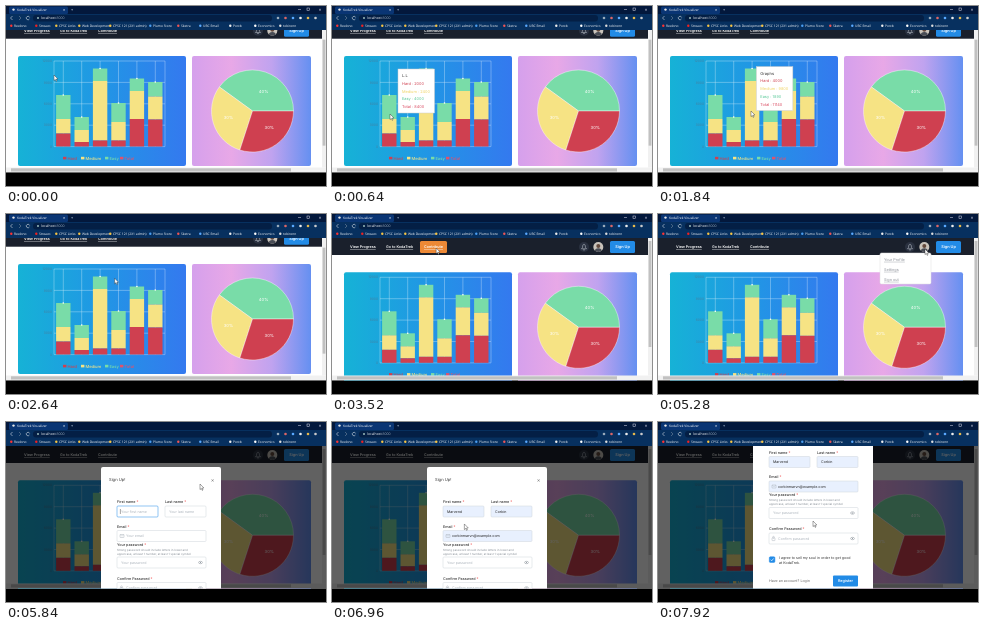
Animation, 320 px wide and 180 px high, one loop 8 s. Source, as an HTML page:

```html
<!DOCTYPE html>
<html lang="en">
<head>
<meta charset="utf-8">
<title>Practice dashboard</title>
<style>
  html, body { margin: 0; width: 100%; height: 100%; overflow: hidden; background: #000; }
  svg { display: block; width: 100vw; height: 100vh; }
  text { font-family: Inter, sans-serif; text-rendering: geometricPrecision; white-space: pre; }
  .ui { font-family: "Open Sans", sans-serif; }
  .medium { font-weight: 500; }
  .strong { font-weight: 600; }
  .link { text-decoration: underline; }
</style>
</head>
<body>
<svg viewBox="0 0 320 180" preserveAspectRatio="none">
  <defs>
    <linearGradient id="sea"><stop stop-color="#16b2d6"/><stop offset=".5" stop-color="#2196e5"/><stop offset="1" stop-color="#3479ef"/></linearGradient>
    <linearGradient id="dusk"><stop stop-color="#d5a0ec"/><stop offset=".33" stop-color="#e8a8e7"/><stop offset=".67" stop-color="#c0a3ef"/><stop offset="1" stop-color="#6590f1"/></linearGradient>
    <clipPath id="page"><rect y="24" width="320" height="142.5"/></clipPath>
    <clipPath id="portrait"><circle cx="266.3" cy="33" r="5"/></clipPath>
  </defs>
  <g id="scene"></g>
</svg>
<script>
const LOOP = 8000, STEP = 80;
const scene = document.getElementById('scene');
const GREEN = '#79dca8', YELLOW = '#f6e384', RED = '#cf4050', BLUE = '#228be6';

// ---- markup helpers ----
const box = (x, y, w, h, fill, r = 0, stroke = 'none') =>
  `<rect x="${x}" y="${y}" width="${w}" height="${h}" rx="${r}" fill="${fill}" stroke="${stroke}" stroke-width=".5"/>`;
const disc = (x, y, r, fill) => `<circle cx="${x}" cy="${y}" r="${r}" fill="${fill}"/>`;
const line = (points, stroke, width = 0.5, fill = 'none') =>
  `<polyline points="${points}" fill="${fill}" stroke="${stroke}" stroke-width="${width}"/>`;
const text = (s, x, y, size, fill, cls = '', anchor = 'start') =>
  `<text x="${x}" y="${y + size * 0.35}" font-size="${size}" fill="${fill}" class="${cls}" text-anchor="${anchor}">${s}</text>`;
const group = (content, attrs) => `<g ${attrs}>${content}</g>`;
const shift = (content, x, y) => group(content, `transform="translate(${x} ${y})"`);
const each = (list, fn) => list.map(fn).join('');

// ---- motion helpers ----
const ramp = (t, a, b) => {
  const p = Math.max(0, Math.min(1, (t - a) / (b - a)));
  return p * p * (3 - 2 * p);
};
function track(t, keys) {
  const i = keys.findIndex(k => k[0] > t);
  if (i < 0) return keys.at(-1).slice(1);
  if (i === 0) return keys[0].slice(1);
  const a = keys[i - 1], b = keys[i], p = ramp(t, a[0], b[0]);
  return a.slice(1).map((v, j) => v + (b[j + 1] - v) * p);
}

const POINTER = [
  [0, 48, 69], [640, 58, 108], [960, 60, 109], [1280, 76, 110], [1840, 93, 105],
  [2400, 112, 98], [2720, 108, 58], [3040, 68, 35], [3440, 104, 34], [3760, 105, 34],
  [4480, 266, 33], [4640, 266, 34], [4960, 238, 56], [5280, 267, 35], [5520, 289, 34],
  [5600, 289, 34], [5840, 194, 62], [6320, 128, 90], [6560, 128, 90], [6800, 128, 100],
  [7360, 150, 110], [7600, 114, 138], [7680, 114, 138], [7920, 155, 99]
];
const TOOLTIP = [
  [160, 57, 70], [560, 66, 63], [960, 66, 63], [1320, 84, 64], [1600, 84, 64],
  [1920, 101, 60], [2160, 103, 59], [2480, 121, 54]
];
const TIPS = [
  ['L.L', 2000, 2400, 4000, 8400],
  ['Trees', 1000, 1700, 1700, 4400],
  ['Graphs', 4000, 9800, 1890, 11140],
  ['Heaps', 800, 2500, 2900, 6200]
];

// Tops of the green, yellow and red parts of each bar.
const BARS = [[89, 113, 127.5], [111, 124, 136], [62.5, 75, 134.5], [97, 116, 134.5], [72.5, 85, 113], [76, 90.5, 113.5]];
const barX = i => 57.3 + i * 18.4;
const BASE = 140.5;

const BOOKMARKS = [
  ['Reelono', 8, '#f33'], ['Streavo', 33, '#e22'], ['CPSC Links', 53, '#f6c445'],
  ['Web Development', 76, '#f6c445'], ['CPSC 121 (2X1 admin)', 107, '#f6c445'],
  ['Plumo Store', 147, '#4a9df0'], ['Sketra', 175, '#e55'], ['UBC Email', 197, '#5aa9ff'],
  ['Postb', 227, '#eee'], ['Economics', 252, '#fff'], ['tobirenn', 277, '#ddd']
];

function chrome() {
  return box(0, 0, 320, 8, '#03183c') + box(3, 0.5, 59, 7.5, '#0a3574', 1.5) +
    disc(7.5, 3.6, 1.2, '#e8e8e8') +
    text('KodaTrek Visualizer', 11, 3.6, 3.3, '#fff', 'ui') +
    text('×', 58, 3.5, 4, '#fff', '', 'middle') + text('+', 66, 3.5, 4, '#cde', '', 'middle') +
    line('292,3.5 295,3.5', '#dde') + box(301, 2, 2.6, 2.6, 'none', 0, '#dde') +
    text('×', 314, 3.5, 4.5, '#dde', '', 'middle') +
    box(0, 8, 320, 16, '#07305f') +
    line('6.5,10 4.5,12 6.5,14', '#fff') + line('13,10 15,12 13,14', '#89a') +
    '<path d="M23.4 13a1.7 1.7 0 1 1 .2-1.5" fill="none" stroke="#fff" stroke-width=".5"/>' +
    box(27, 9, 239, 6.4, '#041f45', 3) + disc(32, 12.1, 1, '#9bb') +
    text('localhost:<tspan fill="#9ab">3000</tspan>', 35, 12.1, 3.5, '#fff', 'ui') +
    each(['#9ab', '#d66', '#5aa9ff', '#eee', '#e6b84c', '#ccc'], (c, i) => disc(272 + i * 7.5, 12, 1.3, c)) +
    each(BOOKMARKS, ([label, x, color]) => disc(x - 2.7, 19.8, 1.2, color) + text(label, x, 19.8, 3.3, '#fff', 'ui'));
}

function nav([px, py]) {
  const links = [['View Progress', 18, 26], ['Go to KodaTrek', 54, 29], ['Contribute', 92, 20]];
  const isOver = (x, w) => py > 27 && py < 39 && px > x - 4 && px < x + w + 3;
  const portrait = box(261, 28, 11, 11, '#c9c3bb') + disc(266.3, 32, 2, '#63493c') + disc(266.3, 38, 3.7, '#484c55');
  return box(0, 24, 320, 17, '#1a202c') +
    each(links, ([label, x, w]) =>
      (isOver(x, w) ? box(x - 4, 27, w + 7, 12, '#ed8936', 1.5) : '') +
      text(label, x, 33, 3.7, '#fff', 'strong link')) +
    disc(252, 33, 5, '#2a3140') +
    '<path d="M249.5 34.8l1-1.3c0-4.4 3-4.4 3 0l1 1.3z" fill="none" stroke="#cbd0d8" stroke-width=".5"/>' +
    disc(252, 35.8, 0.6, '#cbd0d8') +
    group(portrait, 'clip-path="url(#portrait)"') +
    box(278, 27, 25, 12, BLUE, 1.5) + text('Sign Up', 290.5, 33, 3.9, '#fff', 'strong', 'middle');
}

function barChart() {
  const vertical = x => line([x, 55, x, BASE], '#fff', 0.4);
  const grid = each([0, 1, 2, 3, 4], i => {
    const y = 55 + i * 21.4;
    return line([48, y, 159, y], '#fff', 0.4) + text(12000 - i * 3000, 46, y, 3.3, '#56708a', '', 'end');
  }) + each([48, 159, ...BARS.map((_, i) => barX(i))], vertical);
  const bars = each(BARS, ([g, y, r], i) => {
    const x = barX(i) - 7.2;
    return box(x, g, 14.4, y - g, GREEN) + box(x, y, 14.4, r - y, YELLOW) +
      box(x, r, 14.4, BASE - r, RED) + disc(barX(i), g, 0.8, '#fff');
  });
  const legend = [['Hard', 57, RED], ['Medium', 75, YELLOW], ['Easy', 99, GREEN], ['Total', 114, '#e0526c']];
  return box(12, 50, 168, 110, 'url(#sea)', 2) + group(grid, 'opacity=".75"') + bars +
    each(legend, ([label, x, color]) =>
      box(x, 150.8, 3.4, 2.6, color) + text(label, x + 4.4, 152.2, 4.1, color, 'medium'));
}

function pieChart() {
  const cx = 246.5, cy = 105, r = 41;
  const at = (turn, radius) => [cx + Math.cos(turn * 2 * Math.PI) * radius, cy - Math.sin(turn * 2 * Math.PI) * radius];
  let from = 0;
  return box(186, 50, 119, 110, 'url(#dusk)', 2) +
    each([[0.4, GREEN, 'start'], [0.3, YELLOW, 'end'], [0.3, RED, 'start']], ([share, color, anchor]) => {
      const to = from + share, label = at((from + to) / 2, r / 2);
      const slice = `<path d="M${cx} ${cy}L${at(from, r)}A${r} ${r} 0 0 0 ${at(to, r)}z" fill="${color}" stroke="#fff" stroke-width=".4"/>`;
      from = to;
      return slice + text(share * 100 + '%', ...label, 4.2, '#fff', '', anchor);
    });
}

function tooltip(t) {
  if (t < 160 || t >= 2640) return '';
  const [x, y] = track(t, TOOLTIP);
  const [name, ...values] = TIPS[t < 1120 ? 0 : t < 1680 ? 1 : t < 2240 ? 2 : 3];
  const colors = [RED, '#efd25e', '#55c795', '#d8455c'];
  return shift(box(0, 0, 36.5, 44, '#fff', 0, '#ccc') + text(name, 4, 6.5, 4, '#333') +
    each(['Hard', 'Medium', 'Easy', 'Total'], (label, i) =>
      text(`${label} : ${values[i]}`, 4, 14.5 + i * 7.8, 3.9, colors[i])), x, y);
}

function menu(t) {
  if (t < 4640 || t >= 5600) return '';
  return box(222, 39, 51, 31, '#fff', 1.5, '#ddd') +
    each(['Your Profile', 'Settings', 'Sign out'], (label, i) => text(label, 226, 45.5 + i * 10, 3.8, '#8b8f98', 'link'));
}

const fieldLabel = (label, x, y) =>
  text(`${label} <tspan fill="#f03e3e">*</tspan>`, x, y, 3.7, '#333', 'medium');

const ICONS = {
  mail: box(3, 4, 4, 3, 'none', 0.4, '#adb5bd') + line('3,4 5,5.7 7,4', '#adb5bd', 0.4),
  lock: box(3, 5, 3, 2.6, 'none', 0.4, '#adb5bd') + box(3.7, 3.3, 1.6, 1.9, 'none', 0.8, '#adb5bd')
};
const EYE = '<ellipse rx="2" ry="1.2" fill="none" stroke="#868e96" stroke-width=".5"/>' + disc(0, 0, 0.6, '#868e96');

function field(x, y, w, hint, value, { icon, eye, focus } = {}) {
  return shift(box(0, 0, w, 11, value ? '#e8f0fe' : '#fff', 1, focus ? BLUE : '#ced4da') +
    (ICONS[icon] || '') + (eye ? shift(EYE, w - 5.5, 5.5) : '') +
    text(value || hint, icon ? 9 : 4, 5.6, 3.6, value ? '#222' : '#adb5bd'), x, y);
}

function modal(t) {
  const shown = ramp(t, 5600, 5840);
  if (!shown) return '';
  const filled = t >= 6720, checked = t >= 7600;
  const caret = !filled && t % 1040 < 720;
  const form = box(95, 45, 120, 178, '#fff', 2) +
    text('Sign Up!', 103, 58, 4.1, '#333') + text('×', 206.5, 58, 5.5, '#777', '', 'middle') +
    fieldLabel('First name', 111, 80) +
    field(111, 84, 41, 'Your first name', filled && 'Marvend', { focus: !filled }) +
    (caret ? line('114.4,87 114.4,92', '#222', 0.4) : '') +
    fieldLabel('Last name', 159, 80) +
    field(159, 84, 41, 'Your last name', filled && 'Corbin') +
    fieldLabel('Email', 111, 104.5) +
    field(111, 108.5, 89, 'Your email', filled && 'corbinmarvn@example.com', { icon: 'mail' }) +
    fieldLabel('Your password', 111, 122.5) +
    text('Strong password should include letters in lower and', 111, 127.7, 2.9, '#868e96') +
    text('uppercase, at least 1 number, at least 1 special symbol', 111, 131.9, 2.9, '#868e96') +
    field(111, 135, 89, 'Your password', '', { eye: true }) +
    fieldLabel('Confirm Password', 111, 156.5) +
    field(111, 160.5, 89, 'Confirm password', '', { icon: 'lock', eye: true }) +
    box(111.3, 184.3, 5.6, 5.6, checked ? BLUE : '#fff', 1, checked ? BLUE : '#ced4da') +
    (checked ? line('112.6,187.2 113.7,188.3 115.6,186', '#fff', 0.7) : '') +
    text('I agree to sell my soul in order to get good', 121, 184.8, 3.6, '#333') +
    text('at KodaTrek.', 121, 190.5, 3.6, '#333') +
    text('Have an account? Login', 111, 208.7, 3.6, '#666') +
    box(175, 203, 25, 11, BLUE, 1) + text('Register', 187.5, 208.6, 3.8, '#fff', 'strong', 'middle');
  const y = -16 * (1 - shown) - 49.5 * ramp(t, 7040, 7360);
  return group(box(0, 24, 320, 142.5, 'rgba(0,0,0,.62)') + shift(form, 0, y), `opacity="${shown}"`);
}

function autofill(t) {
  if (t < 6400 || t >= 6720) return '';
  return box(111, 96, 52, 13, '#fff', 1, '#ccc') +
    text('Marvend Corbin', 114, 100.5, 3.5, '#222') +
    text('corbinmarvn@example.com', 114, 105.3, 3, '#777');
}

function draw(t) {
  const [px, py] = track(t, POINTER);
  const scroll = 8.3 * (1 - ramp(t, 2640, 2960));
  const page = box(0, 24, 320, 142.5, '#fff') +
    shift(nav([px, py + scroll]), 0, -scroll) +
    shift(barChart() + pieChart(), 0, 8.3 - scroll) +
    tooltip(t) + menu(t) +
    box(0, 161.5, 320, 5, '#f1f1f1') + box(5, 162.3, 280, 3.2, '#c1c1c1') +
    box(316, 24, 4, 137.5, '#f1f1f1') + box(316.6, 27 + scroll * 0.8, 2.8, 106, '#c1c1c1') +
    modal(t) + autofill(t);
  const pointer = '<path d="M0 0v5.6l1.3-1.2 .9 2 .8-.4-.8-1.9 1.7-.1z" fill="#fff" stroke="#222" stroke-width=".4"/>';
  scene.innerHTML = group(page, 'clip-path="url(#page)"') + chrome() + shift(pointer, px, py);
}

let drawn = -1;
function frame(now) {
  const t = Math.floor((now % LOOP) / STEP) * STEP;
  if (t !== drawn) draw(drawn = t);
  requestAnimationFrame(frame);
}
draw(0);
requestAnimationFrame(frame);
</script>
</body>
</html>
```
